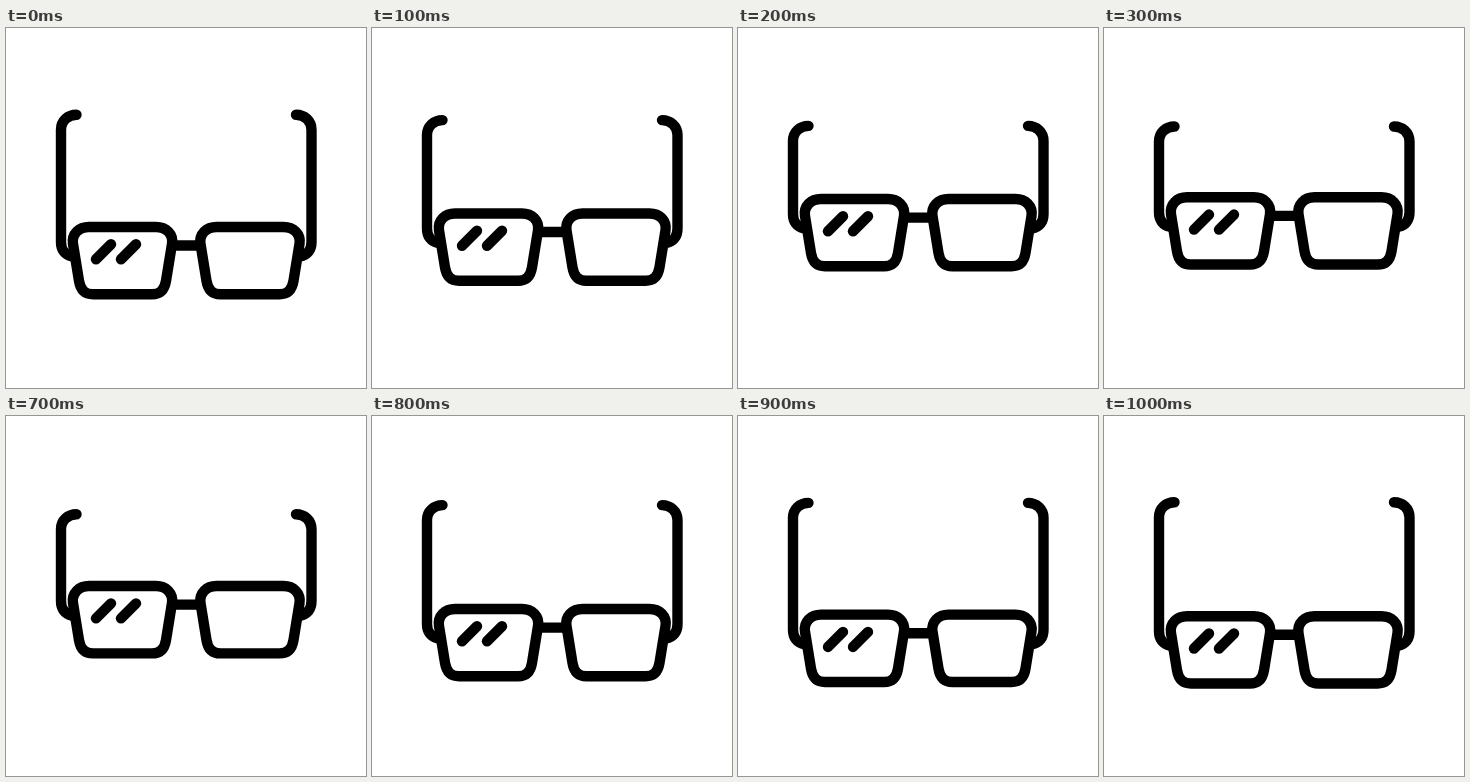
Write an HTML page with a canvas that moves like this. It is 360x360 px and loops after 1300 ms.

```html
<!DOCTYPE html>
<html lang="en">
<head>
<meta charset="utf-8">
<title>Glasses</title>
<style>
html, body { margin: 0; width: 100%; height: 100%; overflow: hidden; background: #fff; }
canvas { display: block; width: 100vw; height: 100vh; }
</style>
</head>
<body>
<canvas id="stage"></canvas>
<script>
const SIZE = 360, LOOP = 1300, STEP = 100, AXIS = 360.5;
// Lift of the glasses per step: 0 is down, 1 is up.
const LIFT = [.04, .47, .93, .985, 1, 1, 1, .96, .23, .05, 0, 0, 0];

const canvas = document.getElementById('stage');
const ctx = canvas.getContext('2d');
const ratio = window.devicePixelRatio || 1;
canvas.width = canvas.height = SIZE * ratio;

function line(x1, y1, x2, y2) {
  ctx.beginPath();
  ctx.moveTo(x1, y1);
  ctx.lineTo(x2, y2);
  ctx.stroke();
}

function lens(y) {
  ctx.beginPath();
  ctx.moveTo(83, y);
  ctx.lineTo(150, y);
  ctx.bezierCurveTo(160, y, 167.5, y + 7, 166, y + 17);
  ctx.lineTo(160, y + 54);
  ctx.bezierCurveTo(158.5, y + 63, 154, y + 67.3, 146, y + 67.3);
  ctx.lineTo(87, y + 67.3);
  ctx.bezierCurveTo(79, y + 67.3, 74.5, y + 63, 73, y + 54);
  ctx.lineTo(67, y + 17);
  ctx.bezierCurveTo(65.5, y + 7, 73, y, 83, y);
  ctx.closePath();
  ctx.stroke();
}

function arm(tip, y) {
  ctx.beginPath();
  ctx.moveTo(70.5, tip);
  ctx.bezierCurveTo(62, tip, 55, tip + 6, 55, tip + 15);
  ctx.lineTo(55, y + 15);
  ctx.bezierCurveTo(55, y + 23, 59, y + 28, 66, y + 29.5);
  ctx.stroke();
}

function side(tip, y) {
  arm(tip, y);
  lens(y);
}

function draw(lift) {
  const y = 200.2 - 31.4 * lift;
  const tip = 86.2 + 12.5 * lift;
  ctx.setTransform(ratio, 0, 0, ratio, 0, 0);
  ctx.fillStyle = '#fff';
  ctx.fillRect(0, 0, SIZE, SIZE);
  ctx.strokeStyle = '#000';
  ctx.lineWidth = 10.4;
  ctx.lineCap = ctx.lineJoin = 'round';

  side(tip, y);
  ctx.save();
  ctx.translate(AXIS, 0);
  ctx.scale(-1, 1);
  side(tip, y);
  ctx.restore();

  line(167, y + 18.6, AXIS - 167, y + 18.6);
  for (const x of [90, 115]) line(x, y + 32.3, x + 15, y + 17.3);
}

function tick() {
  const t = performance.now() % LOOP;
  draw(LIFT[Math.floor(t / STEP)]);
  requestAnimationFrame(tick);
}
tick();
</script>
</body>
</html>
```
